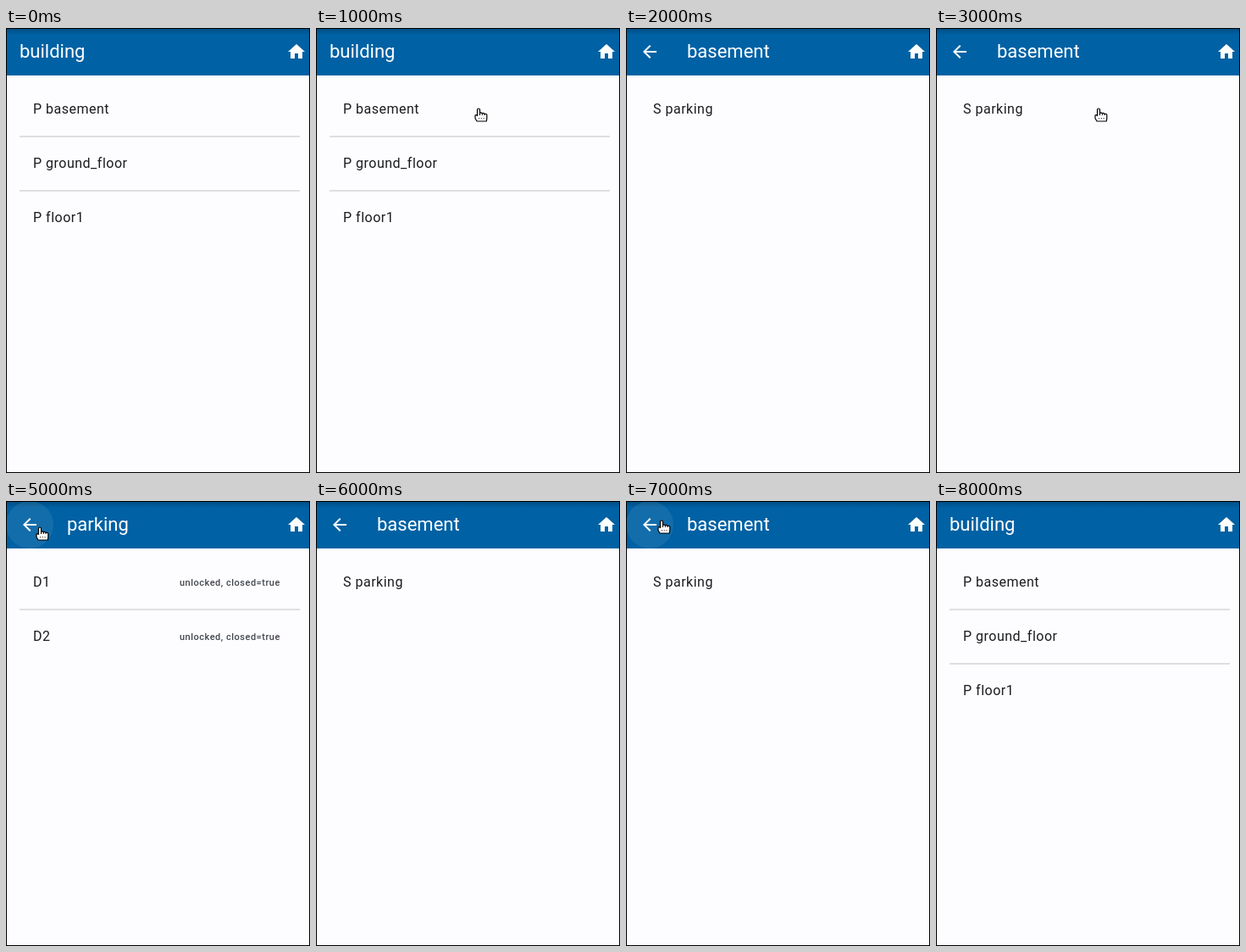
These frames come from a looping animation (359 px wide and 525 px high, 9 s). An HTML page with a canvas:

```html
<!DOCTYPE html>
<html lang="en">
<head>
<meta charset="utf-8">
<title>Building browser</title>
<style>
html, body { margin: 0; width: 100%; height: 100%; overflow: hidden; background: #fdfcff; }
canvas { display: block; }
</style>
</head>
<body>
<canvas id="stage" width="359" height="525"></canvas>
<script>
const W = 359, H = 525, STEP = 1000;
const ctx = document.getElementById('stage').getContext('2d');

const homeIcon = new Path2D('M10 20v-6h4v6h5v-8h3L12 3 2 12h3v8z');
const backIcon = new Path2D('M20 11H7.83l5.59-5.59L12 4l-8 8 8 8 1.41-1.41L7.83 13H20z');
const hand = new Path2D('M3.5 9.5V2.5Q3.5 1 5 1T6.5 2.5V6.5Q8 5.4 9.3 6.7Q10.8 6 12 7.3Q14.8 7 14.8 9V12.5L14.3 16H3L1 12.5V9Q2.3 7.9 3.5 9.5Z');
const handLines = new Path2D('M6.5 6v3M9.3 6.5v2.5M12 7.2v1.8M5.5 12.2v1M8.2 12.2v1M11 12.2v1');

const status = 'unlocked, closed=true';
const building = { title: 'building', rows: [['P basement'], ['P ground_floor'], ['P floor1']] };
const basement = { title: 'basement', back: true, rows: [['S parking']] };
const parking = { title: 'parking', back: true, rows: [['D1', status], ['D2', status]] };

// One entry per second: page, pointer position, back button highlight
const steps = [
  { page: building },
  { page: building, pointer: [187, 94] },
  { page: basement },
  { page: basement, pointer: [187, 94] },
  { page: parking },
  { page: parking, pointer: [35, 30], hover: true },
  { page: basement },
  { page: basement, pointer: [37, 22], hover: true },
  { page: building }
];

function text(str, x, y, size, color, spacing = 0, weight = 400) {
  ctx.font = `${weight} ${size}px Roboto, sans-serif`;
  ctx.letterSpacing = spacing + 'px';
  ctx.fillStyle = color;
  ctx.fillText(str, x, y);
}

function icon(path, x, y) {
  ctx.save();
  ctx.translate(x, y);
  ctx.fillStyle = '#fff';
  ctx.fill(path);
  ctx.restore();
}

function drawHeader(page, hover) {
  ctx.fillStyle = '#0061a4';
  ctx.fillRect(0, 0, W, 56);
  const shade = ctx.createLinearGradient(0, 1, 0, 8);
  shade.addColorStop(0, 'rgba(0,0,0,0.2)');
  shade.addColorStop(1, 'rgba(0,0,0,0)');
  ctx.fillStyle = shade;
  ctx.fillRect(0, 0, W, 8);
  if (hover) {
    ctx.fillStyle = 'rgba(255,255,255,0.08)';
    ctx.beginPath();
    ctx.arc(28, 28, 28, 0, Math.PI * 2);
    ctx.fill();
  }
  if (page.back) icon(backIcon, 16, 16);
  icon(homeIcon, 331, 16);
  text(page.title, page.back ? 72 : 16, 35, 22, '#fff');
}

function drawRows(rows) {
  rows.forEach(([label, note], i) => {
    const y = 64 * i;
    if (i) {
      ctx.fillStyle = '#dfdfe2';
      ctx.fillRect(16, y + 63, 331, 2);
    }
    text(label, 32, y + 101, 16, '#1a1c1e', 0.5);
    if (note) text(note, 205, y + 100, 11, '#42474e', 0.5, 500);
  });
}

function drawPointer([x, y]) {
  ctx.save();
  ctx.translate(x, y);
  ctx.fillStyle = '#fff';
  ctx.strokeStyle = '#000';
  ctx.lineWidth = 1.2;
  ctx.lineJoin = 'round';
  ctx.fill(hand);
  ctx.stroke(hand);
  ctx.lineWidth = 1;
  ctx.stroke(handLines);
  ctx.restore();
}

function draw(ms) {
  const { page, pointer, hover } = steps[Math.floor(ms / STEP) % steps.length];
  ctx.fillStyle = '#fdfcff';
  ctx.fillRect(0, 0, W, H);
  drawHeader(page, hover);
  drawRows(page.rows);
  if (pointer) drawPointer(pointer);
  ctx.strokeStyle = '#000';
  ctx.lineWidth = 1;
  ctx.strokeRect(0.5, 0.5, W - 1, H - 1);
}

let start;
function tick(now) {
  start ??= now;
  draw(Math.max(0, now - start));
  requestAnimationFrame(tick);
}
draw(0);
requestAnimationFrame(tick);
</script>
</body>
</html>
```
